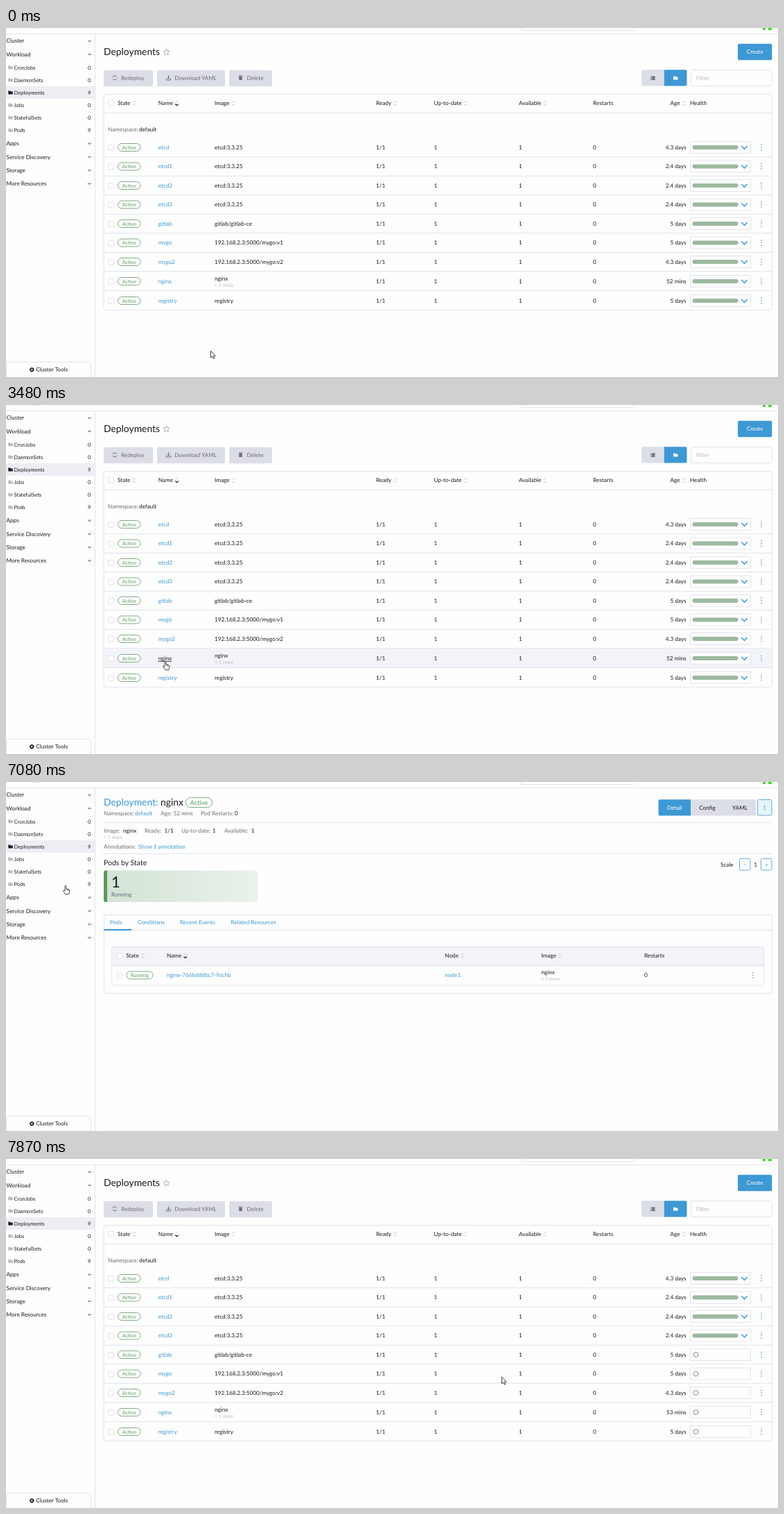
An HTML page with a canvas for the animation above (7.99 s loop, 1114 by 503 pixels).

```html
<!DOCTYPE html>
<html lang="en">
<head>
<meta charset="utf-8">
<title>Deployments</title>
<style>
  html, body { margin: 0; width: 100%; height: 100%; overflow: hidden; background: #fefefe; }
  canvas { display: block; }
</style>
</head>
<body>
<canvas id="stage" width="1114" height="503"></canvas>
<script>
const ctx = document.getElementById('stage').getContext('2d');
const LOOP = 7990;
const INK = '#1b1b21', MUTED = '#6c6c76', LIGHT = '#b9b9c4', LINE = '#dcdee7',
      BLUE = '#3d98d3', GREEN = '#5d995d', BAR = '#9cb99f', PAPER = '#fefefe', HOVER = '#f3f4f9';
const BODY = 8.2, NAV = 7.57, SMALL = 6.9, CHIP = 7.2, TITLE = 13.9, HAIRLINE = 0.8;

// Pointer positions: time, x, y, is hand
const POINTER = [
  [0, 295, 465], [990, 294, 464],
  [1520, 289, 459], [1640, 281, 450], [1760, 272, 440], [1880, 264, 431], [2000, 260, 427],
  [2280, 244, 415], [2400, 230, 405],
  [2550, 203, 394], [2670, 173, 401],
  [2820, 196, 388], [2940, 241, 366], [3060, 241, 372], [3210, 239, 371],
  [3360, 234, 370, 1], [3480, 230, 369, 1], [5940, 230, 369],
  [7080, 86, 149, 1], [7230, 88, 111, 1], [7380, 91, 93, 1], [7500, 91.5, 101.5, 1],
  [7870, 715, 313.5]
];

const DEPLOYMENTS = [
  ['etcd', 'etcd:3.3.25', '4.3 days', 172],
  ['etcd1', 'etcd:3.3.25', '2.4 days', 199.5],
  ['etcd2', 'etcd:3.3.25', '2.4 days', 227],
  ['etcd3', 'etcd:3.3.25', '2.4 days', 254.5],
  ['gitlab', 'gitlab/gitlab-ce', '5 days', 282],
  ['mygo', '192.168.2.3:5000/mygo:v1', '5 days', 309.5],
  ['mygo2', '192.168.2.3:5000/mygo:v2', '4.3 days', 337],
  ['nginx', 'nginx', '52 mins', 365],
  ['registry', 'registry', '5 days', 393]
];

const ARROW = new Path2D('M.5.5V10.2L2.7 8.3 4.3 11.6 5.8 10.9 4.3 7.7H7.2Z');
const HAND = new Path2D('M-1 8V1.3a.95.95 0 0 1 1.9 0V5Q5.3 5.2 5.5 7V9.5Q5.5 10.5 4.5 12.8H0Q-1.5 10.5-3.3 8.2-3.5 7-2.3 7.1Z');
const FOLDER = new Path2D('M-3.2-2.5H-.6L.2-1.6H3.2V2.4H-3.2Z');

// y is the middle of the capital letters
function text(string, x, y, color = INK, size = BODY, align = 'left') {
  ctx.font = `${size}px Lato, sans-serif`;
  ctx.textAlign = align;
  ctx.fillStyle = color;
  ctx.fillText(string, x, y + size * 0.36);
  return ctx.measureText(string).width;
}

function rect(x, y, w, h, color) {
  ctx.fillStyle = color;
  ctx.fillRect(x, y, w, h);
}

function rule(x, y, w) { rect(x, y - HAIRLINE / 2, w, HAIRLINE, LINE); }

function box(x, y, w, h, radius, fill, stroke) {
  ctx.beginPath();
  ctx.roundRect(x, y, w, h, radius);
  if (fill) { ctx.fillStyle = fill; ctx.fill(); }
  if (stroke) { ctx.strokeStyle = stroke; ctx.lineWidth = HAIRLINE; ctx.stroke(); }
}

function lines(points, color, width = 1) {
  ctx.beginPath();
  points.forEach(([x, y]) => ctx.lineTo(x, y));
  ctx.strokeStyle = color;
  ctx.lineWidth = width;
  ctx.stroke();
}

function circle(x, y, r, color, width, dash = []) {
  ctx.setLineDash(dash);
  ctx.beginPath();
  ctx.arc(x, y, r, 0, 7);
  ctx.strokeStyle = color;
  ctx.lineWidth = width;
  ctx.stroke();
  ctx.setLineDash([]);
}

// A negative height points up
function chevron(x, y, half, height, color, width = 1) {
  lines([[x - half, y - height / 2], [x, y + height / 2], [x + half, y - height / 2]], color, width);
}

function folder(x, y, color) {
  ctx.save();
  ctx.translate(x, y);
  ctx.fillStyle = color;
  ctx.fill(FOLDER);
  ctx.restore();
}

function checkbox(x, y) { box(x - 3.5, y - 3.5, 8, 8, 1.5, PAPER, LINE); }

function chip(label, x, y, w, h = 11, size = CHIP) {
  box(x + 0.5, y - h / 2, w, h, h / 2, PAPER, GREEN);
  text(label, x + 0.5 + w / 2, y, GREEN, size, 'center');
}

function dots(x, y, gap = 3.5) {
  for (const dy of [-gap, 0, gap]) box(x - 0.8, y + dy - 0.8, 1.6, 1.6, 0.8, BLUE);
}

function header(label, x, y, sort) {
  const end = x + text(label, x, y) + 5.5;
  if (!sort) return;
  chevron(end, y - 2, 2.2, -2.2, LIGHT, 0.8);
  chevron(end, y + 2.3, 2.2, 2.2, sort === 'down' ? INK : LIGHT, sort === 'down' ? 1.1 : 0.8);
}

function drawFrame(jobsHover) {
  rule(0, 8.5, 1114);
  rect(36, 0, 12, 1, '#e6eaf4');
  box(742.5, -10, 164, 13.5, 2, null, LINE);
  rect(1092, 0, 4, 3, '#45d62f');
  rect(1100, 0, 5, 3, '#45d62f');
  rect(128, 9, HAIRLINE, 494, LINE);

  ['Cluster', 'Workload', 'Apps', 'Service Discovery', 'Storage', 'More Resources'].forEach((label, i) => {
    const y = (i < 2 ? 18.5 : 127.8) + i * 19.25;
    text(label, 0.5, y);
    chevron(120.5, y + 0.3, 2, i === 1 ? -2.2 : 2.2, INK, 0.9);
  });

  ['CronJobs', 'DaemonSets', 'Deployments', 'Jobs', 'StatefulSets', 'Pods'].forEach((label, i) => {
    const y = 56.8 + i * 18.1, active = i === 2;
    if (active || (i === 3 && jobsHover)) rect(0, Math.round(y - 9), 128, 18, '#ededf4');
    folder(6.5, y, active ? INK : LIGHT);
    text(label, 11.5, y, INK, NAV);
    text(active || i === 5 ? '9' : '0', 122.3, y, INK, NAV, 'right');
  });

  box(0.5, 481.5, 122, 30, 3, PAPER, LINE);
  circle(37.3, 492.5, 2, INK, 1.6);
  circle(37.3, 492.5, 3, INK, 1, [1.2, 1.16]);
  text('Cluster Tools', 43.3, 492.5);
}

function drawToolbar() {
  text('Deployments', 141, 34.4, INK, TITLE);
  ctx.beginPath();
  for (let i = 0; i < 10; i++) {
    const a = i * Math.PI / 5 - Math.PI / 2, r = i % 2 ? 2.2 : 4.8;
    ctx.lineTo(231.5 + r * Math.cos(a), 34.8 + r * Math.sin(a));
  }
  ctx.closePath();
  ctx.strokeStyle = '#a5a5af';
  ctx.lineWidth = 0.9;
  ctx.stroke();

  box(1056, 22.8, 49.3, 23.5, 2, BLUE);
  text('Create', 1080.6, 34.5, '#fff', BODY, 'center');

  [['Redeploy', 141, 71, 166], ['Download YAML', 218, 98, 243.3], ['Delete', 322, 62, 347.5]]
    .forEach(([label, x, w, textX]) => {
      box(x, 60.8, w, 23.4, 2, LINE);
      text(label, textX, 72.5, MUTED);
    });
  ctx.strokeStyle = MUTED;
  ctx.lineWidth = 1;
  for (const a of [0.3, 3.44]) {
    ctx.beginPath();
    ctx.arc(157, 71.8, 3, a, a + 2.4);
    ctx.stroke();
  }
  lines([[234.5, 68], [234.5, 73]], MUTED);
  chevron(234.5, 72.3, 2, 2, MUTED);
  lines([[231.5, 73], [231.5, 75], [237.5, 75], [237.5, 73]], MUTED);
  rect(335.5, 68.5, 6, 1, MUTED);
  rect(336.3, 70, 4.4, 5, MUTED);

  box(917, 60.2, 33, 23.4, [2, 0, 0, 2], LINE);
  box(949.8, 60.2, 32.7, 23.4, [0, 2, 2, 0], BLUE);
  for (const y of [69.8, 71.8, 73.8]) {
    rect(930.3, y, 1, 1, INK);
    rect(932, y, 4.5, 1, INK);
  }
  folder(966.3, 72, '#fff');
  box(988.5, 60.5, 116.5, 23, 2, PAPER, LINE);
  text('Filter', 996, 72.5, LIGHT);
}

function drawHeaders(columns) {
  checkbox(151, 107.5);
  columns.forEach(([label, x]) => header(label, x, 108.3,
    label === 'Name' ? 'down' : !['Restarts', 'Health'].includes(label)));
}

function drawEmptyList() {
  drawToolbar();
  box(141, 95.5, 964.5, 26.7, 3, null, LINE);
  drawHeaders([['State', 161], ['Name', 219.7], ['Image', 324], ['Ready', 430], ['Up-to-date', 537],
    ['Available', 695.7], ['Restarts', 833.5], ['Age', 968.3], ['Health', 997]]);
}

function drawList(pointer, reloading) {
  drawToolbar();
  box(141, 95.5, 964.5, 311, 3, null, LINE);
  rule(141, 122.2, 964);
  drawHeaders([['State', 161], ['Name', 219.7], ['Image', 301], ['Ready', 534], ['Up-to-date', 617.5],
    ['Available', 740], ['Restarts', 847], ['Age', 958.5], ['Health', 987]]);
  text('Namespace:', 147, 146.5, MUTED);
  text('default', 192, 146.5);

  DEPLOYMENTS.forEach(([name, image, age, y], i) => {
    const hovered = !reloading && Math.abs(pointer.y - y) < 12, nginx = name === 'nginx';
    if (hovered) rect(141.5, y - 13.75, 963.5, 27.5, HOVER);
    if (i < 8) rule(141, y + 13.75, 964);
    checkbox(151, y);
    chip('Active', 161, y, 32.5);
    const underline = hovered && pointer.hand;
    const width = text(name, 219.7, y, underline ? INK : BLUE);
    if (underline) rect(219.7, y + 4, width, 0.8, INK);
    text(image, 301, nginx ? y - 4 : y);
    if (nginx) text('+ 1 more', 301, y + 5.5, LIGHT, SMALL);
    text('1/1', 534, y);
    text('1', 617.5, y);
    text('1', 740, y);
    text('0', 847, y);
    text(nginx && reloading ? '53 mins' : age, 981.5, y, INK, BODY, 'right');
    box(987.5, y - 8.5, 87, 17, 0, PAPER, LINE);
    if (reloading && i > 3) {
      circle(995.5, y, 3.3, '#85858f', 1.4, [1.5, 0.8]);
    } else {
      box(990.5, y - 3, 66, 6, 3, BAR);
      chevron(1065.5, y + 0.3, 4.2, 4.4, BLUE, 1.5);
    }
    dots(1090, y);
  });
}

function drawDetail() {
  text('Deployment:', 141, 29, BLUE, TITLE);
  text('nginx', 223, 29, INK, TITLE);
  chip('Active', 259, 29.5, 38, 14, 9.3);

  [['Namespace:', 141, 45], ['Age: 52 mins', 223.3, 45], ['Pod Restarts:', 281, 45],
   ['Image:', 141, 70], ['Ready:', 200, 70], ['Up-to-date:', 253, 70], ['Available:', 315, 70],
   ['Annotations:', 141, 93.3]].forEach(([label, x, y]) => text(label, x, y, MUTED));
  [['0', 330, 45], ['nginx', 169, 70], ['1/1', 228.5, 70], ['1', 298, 70], ['1', 353.7, 70]]
    .forEach(([value, x, y]) => text(value, x, y));
  text('default', 186, 45, BLUE);
  text('+ 1 more', 141, 80, LIGHT, SMALL);
  text('Show 1 annotation', 191, 93.3, BLUE);
  rule(141, 58.5, 964);
  rule(141, 103.5, 964);

  box(941.5, 25.3, 46.5, 23.3, [2, 0, 0, 2], BLUE);
  box(988, 25.3, 94, 23.3, [0, 2, 2, 0], LINE);
  text('Detail', 964.7, 37, '#fff', BODY, 'center');
  text('Config', 1012, 37, INK, BODY, 'center');
  text('YAML', 1059, 37, INK, BODY, 'center');
  box(1084.5, 25.5, 20.5, 22.5, 2, '#e8f3fa', BLUE);
  dots(1094.7, 37, 2.6);

  text('Pods by State', 141, 116.5, INK, 10.48);
  text('Scale', 1031, 119);
  text('1', 1079.3, 119);
  [[1058.5, '−'], [1089.5, '+']].forEach(([x, sign]) => {
    box(x, 110.5, 15.5, 16.5, 2, PAPER, BLUE);
    text(sign, x + 7.75, 118.7, BLUE, BODY, 'center');
  });

  const shade = ctx.createLinearGradient(146, 0, 363, 0);
  shade.addColorStop(0, '#d3e3d4');
  shade.addColorStop(1, '#eaf2eb');
  box(141, 127.5, 222, 45.5, 3, shade);
  box(141, 127.5, 5, 45.5, [3, 0, 0, 3], GREEN);
  text('1', 152, 144.5, INK, 22);
  text('Running', 152, 162, MUTED);

  box(141.5, 191.5, 964, 113, 0, null, LINE);
  rule(141, 213.5, 964);
  rect(141, 212, 40, 2, BLUE);
  [['Pods', 150], ['Conditions', 190], ['Recent Events', 251], ['Related Resources', 324.3]]
    .forEach(([label, x]) => text(label, x, 202, BLUE));

  rect(153, 238, 940, 26, HOVER);
  box(152.5, 237.5, 941, 55.5, 3, null, LINE);
  rule(153, 264.5, 940);
  checkbox(163.5, 250);
  checkbox(163.5, 278.5);
  [['State', 173.3, true], ['Name', 232, 'down'], ['Node', 633.3, true], ['Image', 772.5, true], ['Restarts', 921]]
    .forEach(([label, x, sort]) => header(label, x, 250.3, sort));
  chip('Running', 173.5, 278.5, 38);
  text('nginx-766bdddbc7-9zchb', 232, 278.5, BLUE);
  text('node1', 633.3, 278.5, BLUE);
  text('nginx', 772.5, 274);
  text('+ 1 more', 772.5, 283.8, LIGHT, SMALL);
  text('0', 921, 278.5);
  dots(1077.7, 278.5);
}

function drawPointer({ x, y, hand }) {
  const shape = hand ? HAND : ARROW;
  ctx.save();
  ctx.translate(x, y);
  ctx.fillStyle = '#fff';
  ctx.strokeStyle = '#2b2b2b';
  ctx.lineWidth = 0.9;
  ctx.lineJoin = 'round';
  ctx.fill(shape);
  ctx.stroke(shape);
  if (hand) {
    lines([[2.3, 5.6], [2.3, 7.4]], '#2b2b2b', 0.7);
    lines([[3.9, 6], [3.9, 7.6]], '#2b2b2b', 0.7);
  }
  ctx.restore();
}

function render(now) {
  const t = now % LOOP;
  const [, x, y, hand] = POINTER.findLast(([start]) => t >= start);
  const pointer = { x, y, hand };
  ctx.textRendering = 'geometricPrecision';
  rect(0, 0, 1114, 503, PAPER);
  drawFrame(t >= 7230 && t < 7380);
  if (t < 5940) drawList(pointer, false);
  else if (t >= 7870) drawList(pointer, true);
  else if (t >= 7750) drawEmptyList();
  else if (t >= 6250) drawDetail();
  drawPointer(pointer);
}

const started = performance.now();
function tick() {
  render(performance.now() - started);
  requestAnimationFrame(tick);
}
tick();
</script>
</body>
</html>
```
